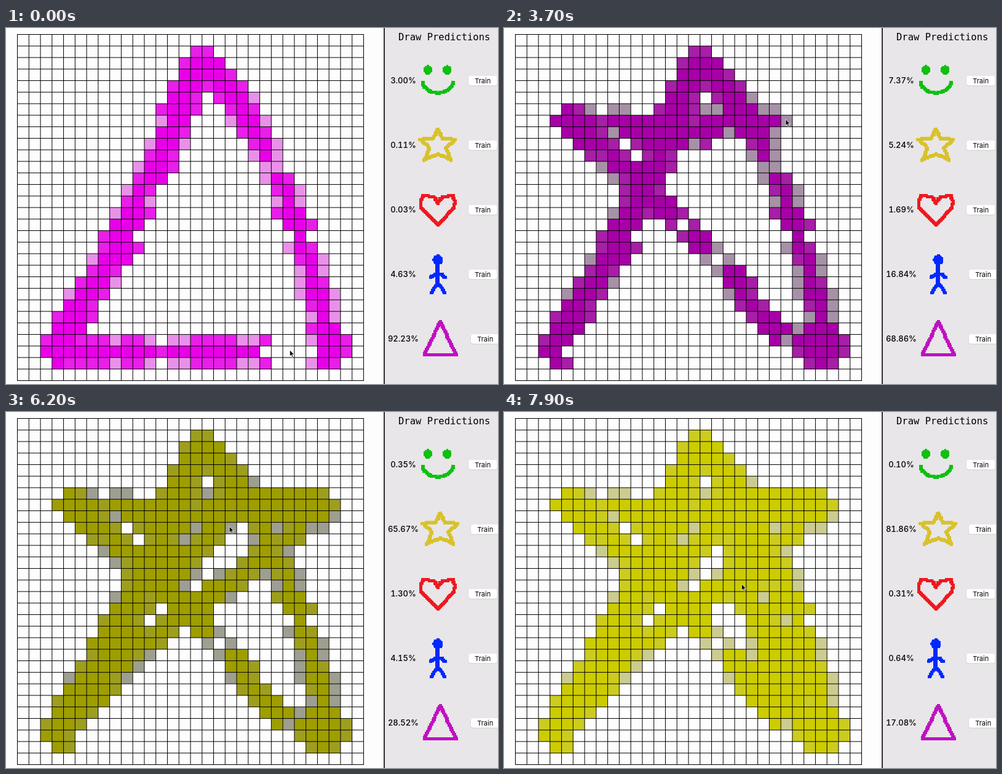
An HTML page that plays this animation: 800x579 px, repeating every 8 s.

```html
<!DOCTYPE html>
<html lang="en">
<head>
<meta charset="utf-8">
<title>Draw Predictions</title>
<style>
  html, body { margin: 0; width: 100%; height: 100%; overflow: hidden; background: #fff; }
  svg { display: block; width: 100vw; height: 100vh; }
  .title { font: 15.5px "DejaVu Sans Mono", monospace; }
  .percent { font: 500 13px Inter, sans-serif; font-variant-numeric: tabular-nums; text-anchor: middle; }
  .label { font: 11px Inter, sans-serif; text-anchor: middle; }
</style>
</head>
<body>
<svg id="stage" viewBox="0 0 800 579"></svg>
<script>
const LOOP = 8000, STEP = 100;
const N = 30, LEFT = 18.5, TOP = 10.5, PITCH = 563 / N;

const stage = document.getElementById('stage');
function add(parent, tag, attrs = {}, text) {
  const el = document.createElementNS('http://www.w3.org/2000/svg', tag);
  for (const key in attrs) el.setAttribute(key, attrs[key]);
  if (text) el.textContent = text;
  parent.append(el);
  return el;
}
const lineX = i => LEFT + i * PITCH;
const lineY = i => TOP + i * PITCH;

// ---- brush strokes: [from ms, to ms, action, path over grid cells]
const strokes = [
  [-1, -1, 'draw', 'M15,2 V3 M14,4 V4 V5 V5 V6 V6 H13 H13 V8 V8 V9 H12 V11 V11 H11 V12 M10,13 V15 V15 H9 V16 ' +
    'M8,17 V17 V18 H9 H9 M8,19 H7 V21 H6 V22 H5 V24 V24 H4 H4 V25 M3,26 V27 V26 V27'],
  [-1, -1, 'draw', 'M15,2 H16 H16 V3 H17 V4 H18 V5 H19 V7 H20 V8 M21,9 V10 M22,12 M23,13 V15 V15 M24,16 V16 M24,18 ' +
    'M25,19 V22 H26 V25 V25 M27,26 V27 V26 V27 M26,27 H26 H26'],
  [-1, -1, 'draw', 'M3,27 H11 M13,27 H25 M4,27 H7 M9,27 H10 M15,27 H18 M21,27'],
  [-1, -1, 'erase', 'M24,27 H22'],
  [0, 0, 'move', 'M23,27'],
  [100, 1000, 'erase', 'M21,27 H5'],
  [1300, 1300, 'move', 'M6,27'],
  [1800, 2950, 'draw', 'M25,27 V26 H24 M22,25 H22 H22 M21,24 M20,23 M19,22 V21 V21 M18,20 M16,18 M15,17 H15 ' +
    'M13,15 V15 M12,14 M11,13 H10 V12 M9,11 H8 V10 M7,9 H6 H6 V8 H5 V7 H4 H4'],
  [3050, 3050, 'move', 'M4,7'],
  [3100, 4200, 'draw', 'M4,7 H6 M8,7 H9 M10,8 H14 H10 H16 H16 V7 H26 H17 H26 V8 M24,9'],
  [4500, 4500, 'move', 'M21,12'],
  [4600, 5400, 'draw', 'M23,10 M21,11 V12 H20 M19,13 M18,14 H17 M16,15 H16 M15,16 H14 M13,17 M12,18 ' +
    'M11,19 H10 M9,20 V21 H8 M7,22 V23 V23 M6,24 M5,25 M4,26 M3,27'],
  [5500, 5500, 'move', 'M3,27'],
  [5700, 6550, 'draw', 'M7,19 H7 M10,16 H10 M13,12 V13 H14 V11 H15 M16,10 M17,9 H19 V10 H20 V11 ' +
    'M20,13 M20,15 V16 V16'],
  [6700, 6700, 'move', 'M21,20'],
  [6800, 7900, 'draw', 'M21,20 V19 M21,18 V17 V18 M21,21 V24 M22,24 V19 M22,16 M23,18 V24 V20 M24,22 V25 ' +
    'M21,13 H22 M20,14 H18 M19,12 V11 V11 V12 M19,13 V14'],
];

function cellsAlong(path) {
  const cells = [];
  let x, y;
  for (const [, cmd, a, b] of path.matchAll(/([MHV])(\d+),?(\d*)/g)) {
    let tx = x, ty = y;
    if (cmd === 'M') { x = tx = +a; y = ty = +b; }
    else if (cmd === 'H') tx = +a;
    else ty = +a;
    do {
      x += Math.sign(tx - x);
      y += Math.sign(ty - y);
      cells.push([x, y]);
    } while (x !== tx || y !== ty);
  }
  return cells;
}

const stamps = strokes.flatMap(([from, to, action, path]) => {
  const cells = cellsAlong(path), last = Math.max(1, cells.length - 1);
  return cells.map(([x, y], i) => ({ x, y, action, t: from + (to - from) * i / last }));
});

function paintAt(t) {
  const hits = new Array(N * N).fill(0);
  for (const { x, y, action, t: when } of stamps) {
    if (when > t) break;
    if (action === 'move') continue;
    const erase = action === 'erase', k = y * N + x;
    hits[k] = erase ? 0 : 3;
    for (const n of [k - 1, k + 1, k - N, k + N]) hits[n] = erase ? 0 : Math.min(3, hits[n] + 1);
  }
  return hits;
}

function cursorAt(t) {
  let i = stamps.findIndex(s => s.t > t);
  if (i < 0) i = stamps.length;
  const a = stamps[i - 1], b = stamps[i] || a;
  const k = b.t > a.t ? (t - a.t) / (b.t - a.t) : 0;
  return [lineX(a.x + (b.x - a.x) * k + 0.6), lineY(a.y + (b.y - a.y) * k + 0.35)];
}

// ---- predictions: tint tells which channels carry the certainty
const times = [0, 1300, 3000, 4500, 5500, 6700, 7900];
const classes = [
  { color: '#0fc00f', tint: [0, 1, 0], odds: [3, .22, 2.72, 12.69, .43, .29, .1],
    lines: [[3, '7,36 10,42 19,50 32,53 45,50 54,42 57,36']], discs: [[16, 15, 7.5], [47, 15, 7.5]] },
  { color: '#d8c22c', tint: [1, 1, 0], odds: [.11, .97, 3.11, 7.67, 48.92, 77.64, 81.86],
    lines: [[3, '32,6 40,22 61,23 45,37 54,56 32,47 10,56 19,37 3,23 24,22 32,6']] },
  { color: '#ee1820', tint: [1, 0, 0], odds: [.03, .03, .41, 3.15, 1.18, 1.39, .31],
    lines: [[3, '32,22 26,11 8,10 4,18 5,29 32,56 59,29 60,18 56,10 40,11 32,22']] },
  { color: '#0028ff', tint: [0, 0, 1], odds: [4.63, .22, 2.37, 33.37, 3.58, 4.55, .64],
    lines: [[4, '32,17 32,45'], [3, '20,38 27,32 37,32 45,38'], [3, '22,62 32,46 43,62']], discs: [[32, 9, 8.5]] },
  { color: '#c010c0', tint: [1, 0, 1], odds: [92.23, 98.57, 91.39, 43.12, 45.88, 16.12, 17.08],
    lines: [[3, '32,4 6,58 58,58 32,4']] },
];

function oddsAt(odds, t) {
  const i = times.findIndex(v => v > t);
  if (i < 0) return odds[odds.length - 1];
  const k = (t - times[i - 1]) / (times[i] - times[i - 1]);
  return odds[i - 1] + (odds[i] - odds[i - 1]) * k;
}

// Blocky icon outline built from small squares
function iconPath({ lines, discs = [] }) {
  const unit = 1.75, size = 40, blocks = new Set();
  for (const [brush, points] of lines) {
    const pts = points.split(' ').map(p => p.split(',').map(v => v / unit));
    for (let i = 1; i < pts.length; i++) {
      const [ax, ay] = pts[i - 1], [bx, by] = pts[i];
      const count = Math.ceil(Math.max(Math.abs(bx - ax), Math.abs(by - ay)));
      for (let s = 0; s <= count; s++) {
        const x = Math.round(ax + (bx - ax) * s / count - brush / 2);
        const y = Math.round(ay + (by - ay) * s / count - brush / 2);
        for (let j = 0; j < brush * brush; j++) blocks.add([x + j % brush, y + Math.floor(j / brush)].join());
      }
    }
  }
  for (const [cx, cy, r] of discs)
    for (let y = 0; y < size; y++)
      for (let x = 0; x < size; x++)
        if (Math.hypot((x + .5) * unit - cx, (y + .5) * unit - cy) <= r) blocks.add([x, y].join());
  return [...blocks].map(b => {
    const [x, y] = b.split(',').map(v => v * unit);
    return `M${x.toFixed(2)} ${y.toFixed(2)}h${unit}v${unit}h-${unit}z`;
  }).join('');
}

// ---- scene
add(stage, 'rect', { width: 800, height: 579, fill: '#fefdfe' });
const board = add(stage, 'g', { 'shape-rendering': 'crispEdges' });
const cells = Array.from({ length: N * N }, (_, k) => add(board, 'rect', {
  x: lineX(k % N), y: lineY(Math.floor(k / N)), width: PITCH, height: PITCH, fill: 'none',
}));
let grid = '';
for (let i = 0; i <= N; i++)
  grid += `M${lineX(i)} ${TOP - .5}V${lineY(N) + .5}M${LEFT - .5} ${lineY(i)}H${lineX(N) + .5}`;
add(stage, 'path', { d: grid, stroke: '#000', fill: 'none' });

add(stage, 'rect', { x: 615, width: 185, height: 579, fill: '#e8e6e8' });
add(stage, 'rect', { x: 614.2, width: 1.6, height: 579, fill: '#000' });
add(stage, 'text', { x: 638, y: 20, class: 'title' }, 'Draw Predictions');

classes.forEach((item, i) => {
  const y = 85 + 105 * i;
  item.percent = add(stage, 'text', { x: 646, y: y + 5, class: 'percent' });
  item.row = add(stage, 'g');
  add(item.row, 'path', {
    d: iconPath(item), fill: item.color, transform: `translate(670 ${y - 32})`, 'shape-rendering': 'crispEdges',
  });
  add(item.row, 'rect', { x: 751.5, y: y - 6.5, width: 47.5, height: 16, rx: 4, fill: '#cfcdcf' });
  add(item.row, 'rect', { x: 752, y: y - 7, width: 46.5, height: 15.5, rx: 3.5, fill: '#fff' });
  add(item.row, 'text', { x: 775.2, y: y + 4.5, class: 'label' }, 'Train');
});

const cursor = add(stage, 'path', {
  d: 'M0 0V10.2L2.4 8L4 11.8L5.7 11L4.1 7.3H7.2Z', fill: '#000', stroke: '#fff', 'stroke-width': .8,
});

function render(t) {
  const odds = classes.map(c => oddsAt(c.odds, t));
  classes.forEach((c, i) => {
    c.percent.textContent = odds[i].toFixed(2) + '%';
    c.row.setAttribute('transform', `translate(${odds[i] >= 10 ? 4 : 0} 0)`);
  });

  const best = Math.max(...odds), { tint } = classes[odds.indexOf(best)];
  const glow = Math.round(2.83 * best - 28);
  const shades = [255, 145, 30, 0].map((gray, level) =>
    level ? `rgb(${tint.map(on => on ? Math.max(gray, glow) : gray)})` : 'none');
  paintAt(t).forEach((level, k) => cells[k].setAttribute('fill', shades[level]));

  cursor.setAttribute('transform', `translate(${cursorAt(t)})`);
}

function frame() {
  const t = performance.now() % LOOP;
  render(Math.floor(t / STEP) * STEP);
  requestAnimationFrame(frame);
}
frame();
</script>
</body>
</html>
```
